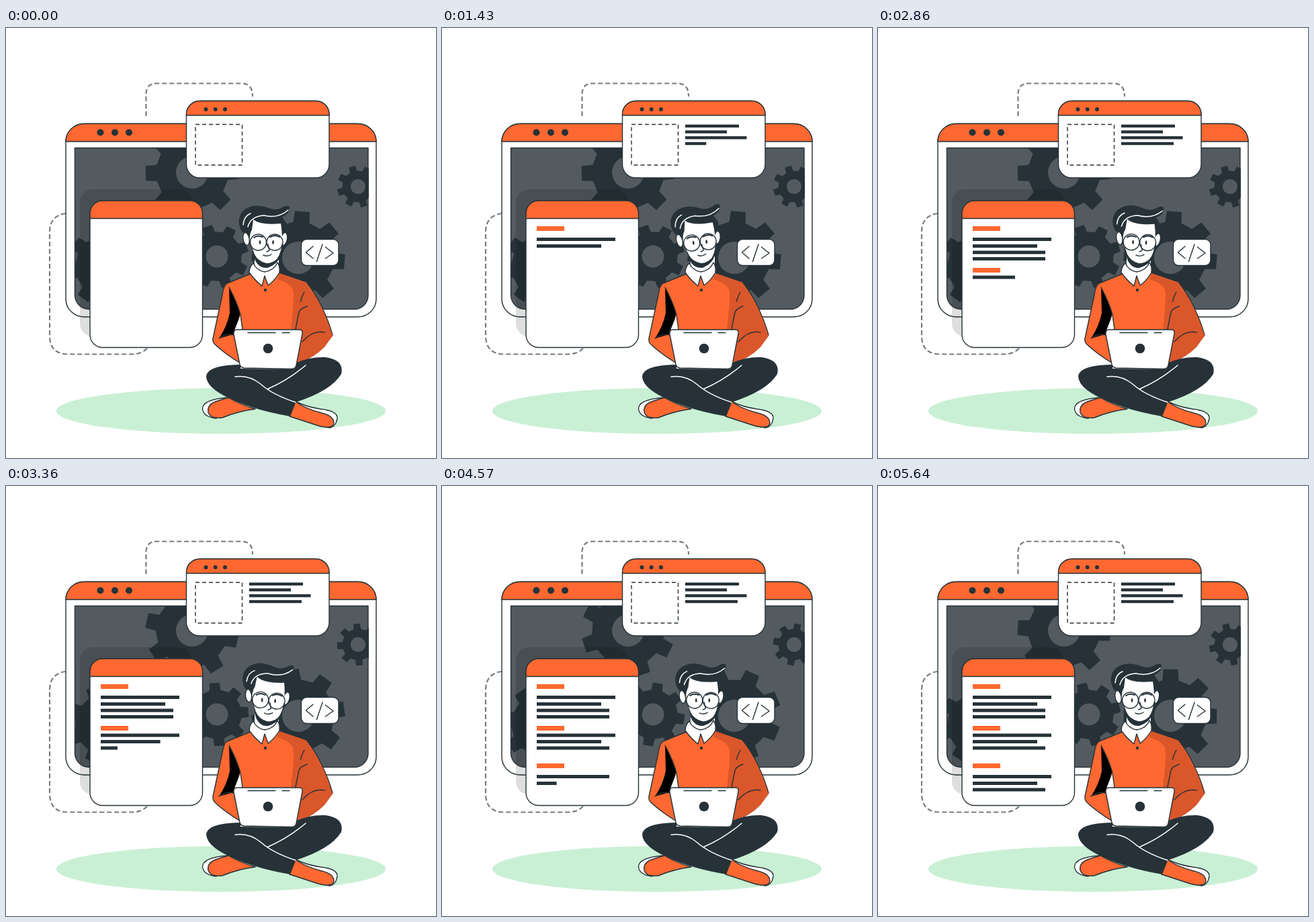
Animation, 640 px wide and 640 px high, one loop 5710 ms. Source, as an HTML page:

```html
<!DOCTYPE html>
<html lang="en">
<head>
<meta charset="utf-8">
<title>Developer at work</title>
<style>
  html, body { margin: 0; width: 100%; height: 100%; overflow: hidden; background: #fff; }
  svg { display: block; width: 100%; height: 100%; }
  .ink { fill: #263238; }
  .orange { fill: #ff6830; }
  .white { fill: #fff; }
  .screen { fill: #535b60; }
  .line { stroke: #263238; stroke-width: 1.4; stroke-linejoin: round; stroke-linecap: round; }
  .none { fill: none; }
  .dash { fill: none; stroke: #747d80; stroke-width: 2.2; stroke-dasharray: 7 4; }
  .light { fill: none; stroke: #fff; stroke-width: 1.5; stroke-linecap: round; }
</style>
</head>
<body>
<svg viewBox="0 0 640 640">
  <defs>
    <clipPath id="view"><path d="M102.5 178.5H540V398A20.500 20.500 0 0 1 519 418.500H124A21 21 0 0 1 102.500 398Z"/></clipPath>
  </defs>

  <path id="blob" fill="none" stroke="#f3f5f4" stroke-dasharray="1 8"
    d="M40 185C42 110 95 55 175 55C245 57 275 100 320 130C390 175 480 195 545 230C585 252 601 290 601 325C598 385 555 405 530 440C490 500 400 515 330 512C250 508 205 470 160 425C95 360 40 285 40 185Z"/>

  <ellipse cx="320" cy="570" rx="245" ry="34" fill="#c9f0d5"/>

  <path class="dash" d="M208.500 131V98Q209 82.500 224 82.500H352Q367 83 367 102"/>
  <path class="dash" d="M89 276Q65 279 65 304V459Q66 485.500 92 485.500H184Q204 486 212 474"/>

  <!-- main window -->
  <rect class="white line" x="89" y="142.500" width="462" height="287.500" rx="27"/>
  <path class="orange line" d="M89 169A27 26.500 0 0 1 116 142.500H524A27 26.500 0 0 1 551 169Z"/>
  <g class="ink"><circle cx="140.500" cy="155.500" r="5"/><circle cx="162" cy="155.500" r="5"/><circle cx="183" cy="155.500" r="5"/></g>
  <path class="screen line" d="M102.500 178.500H539V398A20.500 20.500 0 0 1 518 418.500H124A21 21 0 0 1 102.500 398Z"/>
  <g id="gears" clip-path="url(#view)"></g>

  <!-- document window -->
  <rect x="110" y="240" width="167" height="219" rx="19" opacity=".13"/>
  <rect class="white line" x="125" y="257" width="167.500" height="218.500" rx="19"/>
  <path class="orange line" d="M125 283.500V276A19 19 0 0 1 144 257H273.500A19 19 0 0 1 292.500 276V283.500Z"/>

  <!-- upper window -->
  <rect class="white line" x="268.500" y="108.500" width="212.500" height="114.500" rx="20"/>
  <path class="orange line" d="M268.500 130V128.500A20 20 0 0 1 288.500 108.500H461A20 20 0 0 1 481 128.500V130Z"/>
  <g class="ink"><circle cx="297.500" cy="121" r="3"/><circle cx="311.700" cy="121" r="3"/><circle cx="326" cy="121" r="3"/></g>
  <rect class="none line" x="282" y="143.500" width="69.500" height="60.500" stroke-dasharray="6 4" style="stroke-linecap:butt"/>
  <g id="text"></g>

  <!-- code card -->
  <rect class="white line" x="439.500" y="314.500" width="55.500" height="39" rx="8"/>
  <path class="none line" d="M457 325L446.500 334L457 343M471 322L462.500 347.500M475.500 326L487 335L475.500 343"/>

  <!-- body -->
  <path class="orange line" d="M366 365L329 380Q324 383 322 397L308 462Q307 467 311 471Q326 485 349 499H434Q458 490 473 474L486 457Q481 438 470 415Q460 394 447 378L406 364Z"/>
  <path fill="#d9572a" d="M404 374Q426 381 428 393Q429 405 424 449H441L434 499Q458 491 474 475L486.500 457.500L485 456Q479 437 469 416Q459 395 446.500 378.500L407 365Z"/>
  <path d="M332 386Q340 402 348 422Q349 428 344 441L338 456L317 462Q329 444 333 424Z"/>
  <path class="white" d="M349 427L352 449L340 450Z"/>
  <path class="none line" d="M332 386Q344 408 349 427L352 449M317 462Q327 454 340 457M444 393Q440 400 438.500 407M448 414Q438 418 436 423L431 448M474 453Q457 449 441 467"/>

  <!-- neck and collar -->
  <path class="white" d="M370 340H406V362L386 371L370 360Z"/>
  <path class="white line" d="M368 350Q362 356 362 364Q370 375 381 384L385 369L390 383Q400 376 407 364Q408 354 404 349Q399 361 385 363Q373 361 368 350Z"/>
  <circle class="ink" cx="386" cy="390" r="2.200"/>

  <g id="head">
    <path class="ink" d="M365 322L370 344Q376 358 389 357Q404 352 408 340L411 315Z"/>
    <path class="ink" d="M361 322Q359 306 352 304Q345 294 347 284Q350 269 367 265Q378 263 391 268Q403 273 413 266Q422 262 422 268Q422 277 411 281L417 290Q418 299 415 307L411 320Z"/>
    <ellipse class="white line" cx="357.500" cy="314" rx="4.500" ry="9.500" transform="rotate(-10 357.500 314)"/>
    <ellipse class="white line" cx="414" cy="314" rx="4.500" ry="9.500" transform="rotate(10 414 314)"/>
    <path class="white" d="M368 285Q379 294 409 291Q411 302 411 317Q410 335 403 344Q395 351 387 350Q375 347 370 337L363 318Q362 307 366 300Z"/>
    <path class="light" d="M353 293Q354 280 364 276M360 296Q364 280 384 279Q405 284 420 271"/>
    <g class="none line">
      <circle cx="375.500" cy="319" r="12"/><circle cx="400" cy="319" r="12"/>
      <path d="M387.500 319H388M390 322L392 331L388 333M383 338Q389 341 395 337"/>
      <path d="M369 312Q374 308 382 311M393 311Q401 307 407 311" stroke-width="2"/>
    </g>
    <ellipse class="ink" cx="378" cy="319" rx="1.400" ry="3"/>
    <ellipse class="ink" cx="397.500" cy="319" rx="1.400" ry="3"/>
  </g>

  <!-- shoes, legs, laptop -->
  <path class="white line" d="M330 550Q292 553 292.500 567Q294 579 313 581L335 565Z"/>
  <path class="orange line" d="M331 550L312 556Q299 561 301 572Q304 582 322 580Q346 570 371 567Q350 561 331 550Z"/>
  <path class="white line" d="M431 556Q448 564 468 567Q494 570 493 581Q491 594 481 595L450 585Z"/>
  <path class="orange line" d="M431 556L422 578L465 592Q488 598 488 587Q487 577 470 573Q446 567 431 556Z"/>
  <path class="ink" d="M349 501Q300 502 298 518Q298 533 324 547Q364 568 423 578L431 557Q484 540 499 515Q504 494 475 490Q453 489 433 498L429 508L349 507Z"/>
  <path class="light" d="M341 519Q362 516 379 530Q397 546 431 557M390 537Q420 524 446 502"/>
  <path class="white line" d="M344 449H437Q442 449 441 455L432 502Q431 507.500 425 507.500L354 506Q349 505 348 501L339 456Q338 449 344 449Z"/>
  <path class="none line" d="M360 453.500H401M411 453.500H422"/>
  <circle class="ink" cx="390" cy="477" r="7.300"/>
</svg>

<script>
const FRAMES = 80, STEP = 5714.3 / FRAMES, LOOP = 5710;
const TYPE_TIME = 6.5;
const $ = id => document.getElementById(id);

function add(parent, tag, attrs) {
  const el = document.createElementNS('http://www.w3.org/2000/svg', tag);
  for (const name in attrs) el.setAttribute(name, attrs[name]);
  return parent.appendChild(el);
}

function gearPath(outer, root) {
  const points = [];
  for (let tooth = 0; tooth < 8; tooth++) {
    for (const [r, a] of [[root, -13], [outer, -9], [outer, 9], [root, 13]]) {
      const angle = (tooth * 45 + a) * Math.PI / 180;
      points.push((r * Math.cos(angle)).toFixed(2) + ' ' + (r * Math.sin(angle)).toFixed(2));
    }
  }
  return 'M' + points.join('L') + 'Z';
}

// x, y, outer radius, root radius, hole radius, start angle, direction
const gears = [
  [277, 215, 70, 54, 24, -1, -1],
  [435, 342, 70, 54, 24, 5, 1],
  [314, 340, 47.5, 37, 16.5, -18, -1],
  [150, 355, 60, 47, 20, -8, 1],
  [524, 236, 31.5, 23.5, 11, -17, -1]
].map(([x, y, outer, root, hole, start, dir]) => {
  const el = add($('gears'), 'g', {});
  add(el, 'path', { d: gearPath(outer, root), class: 'ink' });
  add(el, 'circle', { r: hole, class: 'screen' });
  return { el, x, y, start, dir };
});

// x, y, width, height, start step, colour class
const rows = [
  [141, 295, 41, 7, 1, 'orange'],
  [141, 312, 117, 5, 7.4, 'ink'],
  [141, 322, 96, 5, 11.8, 'ink'],
  [141, 331.5, 108, 5, 20.1, 'ink'],
  [141, 341, 108, 5, 25, 'ink'],
  [141, 357, 41, 7, 30.5, 'orange'],
  [141, 368.5, 117, 5, 36.5, 'ink'],
  [141, 378, 96, 5, 41, 'ink'],
  [141, 387.5, 108, 5, 45.5, 'ink'],
  [141, 413, 41, 7, 52, 'orange'],
  [141, 430, 117, 5, 58, 'ink'],
  [141, 440, 96, 5, 62, 'ink'],
  [141, 449.5, 108, 5, 66, 'ink'],
  [362, 143.7, 80, 4.4, 1, 'ink'],
  [362, 152.4, 62, 4.4, 6, 'ink'],
  [362, 161.1, 91.5, 4.4, 11.5, 'ink'],
  [362, 169.8, 78, 4.4, 17.4, 'ink']
].map(([x, y, width, height, start, cls]) => ({
  el: add($('text'), 'rect', { x, y, width: 0, height, class: cls }), width, start
}));

// step, head angle
const sway = [[0, 0], [16, -5], [18, -5], [51, 4.4], [66, .2], [80, 0]];

function headAngle(step) {
  const i = sway.findIndex(key => key[0] > step);
  const [s0, a0] = sway[i - 1], [s1, a1] = sway[i];
  const ease = (1 - Math.cos(Math.PI * (step - s0) / (s1 - s0))) / 2;
  return a0 + (a1 - a0) * ease;
}

function draw(ms) {
  const step = Math.min(FRAMES - 1, Math.floor((ms % LOOP + 5) / STEP));
  const turn = step / FRAMES;
  for (const { el, x, y, start, dir } of gears) {
    el.setAttribute('transform', `translate(${x} ${y}) rotate(${start + dir * turn * 360})`);
  }
  for (const { el, width, start } of rows) {
    const shown = Math.max(0, Math.min(1, (step - start) / TYPE_TIME));
    el.setAttribute('width', width * shown);
  }
  $('head').setAttribute('transform', `rotate(${headAngle(step)} 386 363)`);
  const grow = 1 + .05 * (1 - Math.cos(turn * 2 * Math.PI));
  $('blob').setAttribute('transform', `translate(320 285) scale(${grow}) translate(-320 -285)`);
}

const begin = performance.now();
function tick() {
  draw(performance.now() - begin);
  requestAnimationFrame(tick);
}
tick();
</script>
</body>
</html>
```
